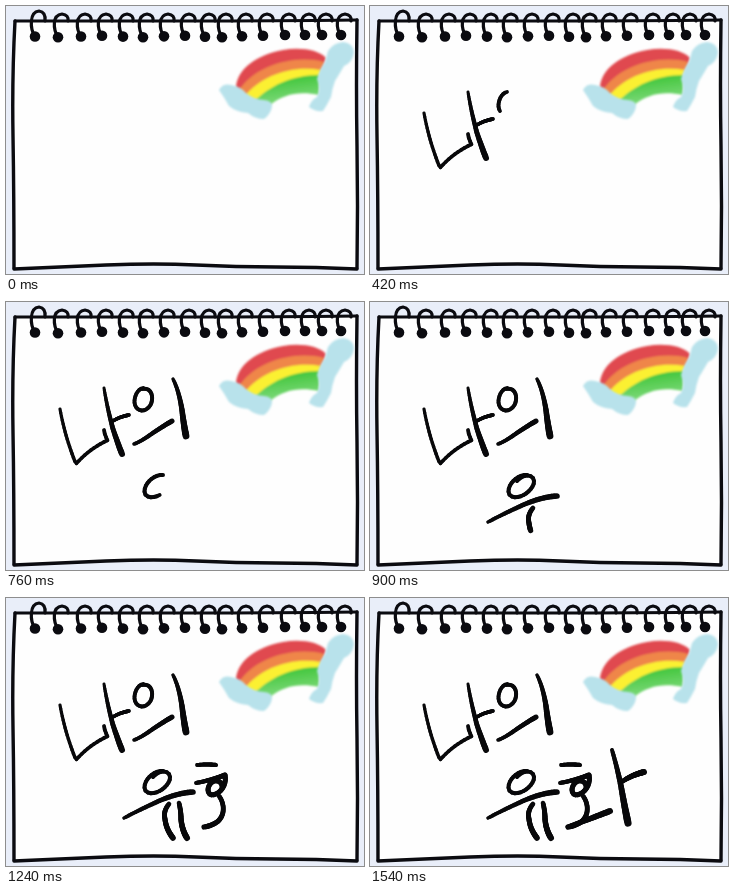
An HTML page that plays this animation: 358x268 px, repeating every 1560 ms.

```html
<!DOCTYPE html>
<html lang="ko">
<head>
<meta charset="utf-8">
<title>나의 유화</title>
<style>
html, body { margin: 0; width: 100%; height: 100%; overflow: hidden; background: #e9eef9; }
svg { display: block; width: 100vw; height: 100vh; }
</style>
</head>
<body>
<svg id="stage" viewBox="0 0 358 268" role="img" aria-label="나의 유화">
  <defs>
    <filter id="soft"><feGaussianBlur stdDeviation=".5"/></filter>
    <filter id="paint"><feGaussianBlur stdDeviation=".9"/></filter>
    <linearGradient id="green" x2=".3" y2="1">
      <stop offset=".3" stop-color="#48c842"/>
      <stop offset="1" stop-color="#7fda7c"/>
    </linearGradient>
  </defs>
  <rect width="358" height="268" fill="#e9eef9"/>
  <path d="M9 15L352 14L351 140L352 263Q270 261 180 259Q90 258 8 263L7 120Z" fill="#fefefe"/>
  <g filter="url(#soft)" fill="none" stroke="#0b0b10" stroke-linecap="round" stroke-linejoin="round">
    <path d="M9 15Q90 15 180 15T351 14" stroke-width="3"/>
    <path d="M9 15Q6 70 7 130T8 262" stroke-width="3.4"/>
    <path d="M351 14Q350 80 351 140T351 262" stroke-width="3.4"/>
    <path d="M8 263Q50 261 100 259T190 259T270 261T351 263" stroke-width="3.4"/>
  </g>
  <g id="rings" filter="url(#soft)" fill="none" stroke="#0b0b10" stroke-width="3.2" stroke-linecap="round"/>

  <g filter="url(#paint)">
    <path d="M230 84C229 65 249 49 277 44C295 41 313 44 320 52L317 62C292 50 257 58 233 87Z" fill="#e04a50"/>
    <path d="M232 86C247 60 288 48 318 56L315 67C290 61 264 67 241 92Z" fill="#ef864a"/>
    <path d="M239 90C255 70 285 59 315 64L313 73C290 70 271 77 250 96Z" fill="#fbf030"/>
    <path d="M248 96C263 80 286 69 314 69L313 89C293 85 278 88 264 99Z" fill="url(#green)"/>
  </g>
  <g filter="url(#paint)" fill="#b8e2eb">
    <path d="M213 84Q217 77 225 79Q234 80 240 87Q249 94 258 94Q267 95 266 101Q264 109 258 113Q249 113 242 107Q230 106 223 100Q218 91 213 84Z"/>
    <path d="M322 45Q327 37 337 36Q347 37 348 46Q347 56 338 60Q334 67 329 75Q326 83 325 91Q321 99 317 105Q309 106 303 101Q305 94 311 91Q315 83 311 73Q314 62 319 56Z"/>
  </g>
  <g id="ink" stroke="#08080a" stroke-linecap="round"/>
</svg>
<script>
const NS = "http://www.w3.org/2000/svg";
const LOOP = 1560, STEP = 20, PIECES = 28;
const ink = document.getElementById("ink");
const rings = document.getElementById("rings");
const marks = [];

function add(parent, tag, attrs) {
  const el = document.createElementNS(NS, tag);
  for (const key in attrs) el.setAttribute(key, attrs[key]);
  return parent.appendChild(el);
}

[29, 52, 75, 96, 117, 137, 158, 179, 199, 216, 236, 257, 279, 299, 316, 335].forEach((x, i) => {
  const y = i > 11 ? 29 : 30.5 + Math.sin(i * 1.6) * 0.8;
  const top = i ? 8 : 5;
  add(rings, "path", {
    d: `M${x} ${y}C${x - 5} 23 ${x - 6} ${top + 1} ${x + 4} ${top}Q${x + 11} ${top + 1} ${x + 10} 15`
  });
  add(rings, "circle", { cx: x, cy: y, r: 5.3, fill: "#0b0b10", stroke: "none" });
});

// A brush stroke drawn from start to end while its width changes from w0 to w1.
function brush(start, end, w0, w1, d) {
  const path = add(ink, "path", { d, fill: "none", stroke: "none" });
  const length = path.getTotalLength();
  const at = k => path.getPointAtLength(length * k / PIECES);
  for (let k = 0; k < PIECES; k++) {
    const a = at(k), b = at(k + 1);
    const el = add(ink, "line", {
      x1: a.x, y1: a.y, x2: b.x, y2: b.y,
      "stroke-width": w0 + (w1 - w0) * k / (PIECES - 1),
      visibility: "hidden"
    });
    marks.push({ el, time: start + (end - start) * (k + 1) / PIECES });
  }
  path.remove();
}

// 나
brush(10, 160, 3.2, 3.8, "M54 107Q59 135 70 162Q83 147 102 138Q99 135 98 128");
brush(190, 280, 3, 6, "M98 86Q101 105 107 127Q112 142 116 152");
brush(300, 350, 3.4, 3.8, "M107 119Q113 115 123 113");
// 의
brush(370, 500, 3.8, 4, "M137 86C131 87 127 97 129 103C132 111 141 110 145 102C148 94 145 85 136 87");
brush(530, 600, 3.6, 5, "M128 142Q134 140 144 133T166 119");
brush(615, 690, 3.4, 6.8, "M167 77Q173 89 176 108Q178 124 180 134");
// 유
brush(710, 800, 4, 4, "M157 173C147 172 136 184 139 192C144 200 161 192 164 181C165 172 154 171 147 179");
brush(810, 870, 3.6, 5.6, "M118 220Q135 211 153 203T187 194");
brush(870, 915, 4.6, 5.6, "M163 206Q157 213 159 221Q160 231 167 240");
brush(940, 1000, 4.6, 6, "M173 205Q175 213 175 221Q176 232 181 240");
// 화
brush(1025, 1055, 3.8, 4.2, "M191 167Q200 166 210 167");
brush(1075, 1105, 4, 5, "M190 185Q206 182 219 177");
brush(1110, 1180, 5, 5, "M219 177C221 186 215 196 206 197C200 196 201 186 208 183C214 182 217 186 216 191");
brush(1185, 1240, 4.6, 5.2, "M213 198C219 206 219 218 211 224Q205 228 198 229");
brush(1260, 1330, 4.8, 6, "M198 229Q217 222 240 213");
brush(1355, 1450, 4, 7.2, "M242 152Q247 169 251 188Q255 211 258 225");
brush(1475, 1540, 4.6, 6, "M253 183Q262 177 274 174");

function draw(now) {
  const t = Math.floor(now % LOOP / STEP) * STEP;
  for (const m of marks) m.el.setAttribute("visibility", t >= m.time ? "visible" : "hidden");
}

function tick() {
  draw(performance.now());
  requestAnimationFrame(tick);
}
tick();
</script>
</body>
</html>
```
